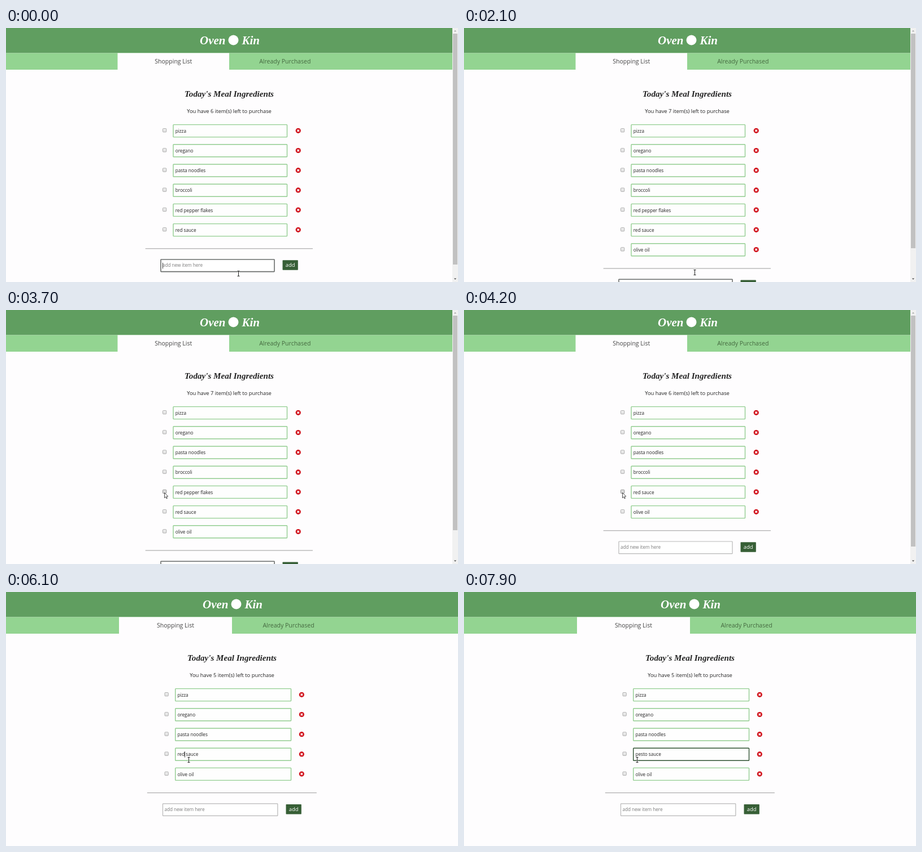
An HTML page with a canvas that plays this animation: 800 px wide and 451 px high, repeating every 8000 ms.

```html
<!DOCTYPE html>
<html lang="en">
<head>
<meta charset="utf-8">
<title>Shopping list</title>
<style>
  html, body { margin: 0; width: 100%; height: 100%; overflow: hidden; background: #fefdfe; }
  canvas { display: block; width: 800px; height: 451px; }
</style>
</head>
<body>
<canvas id="stage" width="800" height="451"></canvas>
<script>
const ctx = document.getElementById('stage').getContext('2d');
const LOOP = 8000, STEP = 100;
const ADD = 1600, CHECK_1 = 4000, CHECK_2 = 5400, FOCUS = 6100;
const TYPE_1 = 200, TYPE_2 = 6800;
const ROW_TOP = 182.6, PITCH = 35.2;
const sans = px => px + 'px "Open Sans", "Noto Sans", sans-serif';
const fancy = px => 'italic bold ' + px + 'px "Liberation Serif", "Noto Serif", serif';
const ITEM = sans(8.19), BODY = sans(9.36), TAB = sans(10.53);

// horizontal layout with and without the scrollbar
const NARROW = { w: 790, check: 277, box: 296, boxW: 201.5, icon: 517.2, input: 274, inputW: 201, button: 489.5 };
const WIDE = { w: 800, check: 280.5, box: 299.7, boxW: 204.8, icon: 523.3, input: 277.5, inputW: 203.3, button: 495.5 };

// pointer path: time, x, y
const PATH = [
  [0, 411, 436], [2000, 411, 436], [2900, 316, 371], [3100, 316, 371], [3700, 280.5, 324.5],
  [4500, 280.5, 324.5], [5000, 282, 290], [5500, 282, 290], [6000, 323, 298],
  [6200, 323, 298], [6600, 306, 298], [8000, 306, 298]
];

function pointer(t) {
  const i = Math.max(1, PATH.findIndex(p => p[0] > t));
  const [t0, x0, y0] = PATH[i - 1], [t1, x1, y1] = PATH[i];
  const u = (t - t0) / (t1 - t0), e = u * u * (3 - 2 * u);
  return { x: x0 + (x1 - x0) * e, y: y0 + (y1 - y0) * e };
}

const typed = (word, t, start, gap) =>
  word.slice(0, Math.max(0, Math.min(word.length, Math.floor((t - start) / gap) + 1)));

// the caret stays solid for half a second after each key, then blinks
const blink = ms => Math.floor(ms / 500) % 2 === 0;

function rect(x, y, w, h, color) {
  ctx.fillStyle = color;
  ctx.fillRect(x, y, w, h);
}

function rounded(x, y, w, h, r, fill, stroke, line) {
  ctx.beginPath();
  ctx.roundRect(x, y, w, h, r);
  if (fill) { ctx.fillStyle = fill; ctx.fill(); }
  if (stroke) { ctx.strokeStyle = stroke; ctx.lineWidth = line; ctx.stroke(); }
}

function disc(x, y, r, color) {
  ctx.fillStyle = color;
  ctx.beginPath();
  ctx.arc(x, y, r, 0, Math.PI * 2);
  ctx.fill();
}

function text(str, x, y, font, color, align = 'left') {
  ctx.font = font;
  ctx.fillStyle = color;
  ctx.textAlign = align;
  ctx.fillText(str, x, y);
}

function width(str, font) {
  ctx.font = font;
  return ctx.measureText(str).width;
}

function poly(points, fill, stroke) {
  ctx.beginPath();
  points.forEach(([x, y]) => ctx.lineTo(x, y));
  ctx.closePath();
  ctx.fillStyle = fill;
  ctx.fill();
  if (stroke) { ctx.strokeStyle = stroke; ctx.lineWidth = 0.8; ctx.stroke(); }
}

function header(L) {
  const c = L.w / 2, q = L.w / 4;
  rect(0, 0, L.w, 44.5, '#609e60');
  rect(0, 44.5, L.w, 29.5, '#93d491');
  rect(q, 44.5, q, 30, '#fefdfe');
  text('Oven', c - 52, 28.5, fancy(21), '#fff');
  disc(c + 7.5, 21.5, 9, '#fff');
  text('Kin', c + 22.5, 28.5, fancy(21), '#fff');
  text('Shopping List', q * 1.5, 63.2, TAB, '#444', 'center');
  text('Already Purchased', q * 2.5, 63.2, TAB, '#44683f', 'center');
  text("Today's Meal Ingredients", c, 122, fancy(15.1), '#222', 'center');
}

function checkbox(x, y, hover) {
  const g = ctx.createLinearGradient(0, y - 4, 0, y + 3);
  g.addColorStop(0, hover ? '#e4e4e4' : '#f0f0f0');
  g.addColorStop(1, hover ? '#cfcfcf' : '#dedede');
  rounded(x + 0.5, y - 4.1, 6.3, 6.3, 1, g, hover ? '#8a8a8a' : '#a8a8a8', 0.9);
}

function removeIcon(x, y) {
  disc(x, y, 4.6, '#d0111b');
  ctx.strokeStyle = '#fff';
  ctx.lineWidth = 1.5;
  ctx.beginPath();
  for (const s of [-1, 1]) {
    ctx.moveTo(x - 1.7, y - 1.7 * s);
    ctx.lineTo(x + 1.7, y + 1.7 * s);
  }
  ctx.stroke();
}

function row(L, label, y, hover, focused) {
  checkbox(L.check, y, hover);
  rounded(L.box, y - 11, L.boxW, 22, 0.8, '#fefefe', focused ? '#2f5231' : '#92cd90', 1.4);
  text(label, L.box + 3.7, y + 3.1, ITEM, '#222');
  removeIcon(L.icon, y - 0.3);
}

function caret(x, y) {
  rect(Math.round(x), y - 5, 0.8, 10.5, '#111');
}

function footer(L, y, value, focused, caretOn) {
  rect(L.w * 0.3125 - 0.2, y - 0.6, L.w * 0.375, 1.1, '#a5a5a5');
  const mid = y + 30;
  rounded(L.input, mid - 10.8, L.inputW, 21.6, 0.6, '#fff', focused ? '#6a6d6c' : '#b7b7b7', focused ? 1.6 : 1.2);
  const x = L.input + 2.9;
  text(value || 'add new item here', x, mid + 2.6, ITEM, value ? '#222' : '#7b7b7b');
  if (focused && caretOn) caret(x + width(value, ITEM) - 0.3, mid);
  rounded(L.button, mid - 9.6, 27.3, 17.6, 0.8, '#375f36');
  text('add', L.button + 13.65, mid + 2.6, BODY, '#fff', 'center');
}

function scrollbar(thumbEnd) {
  rect(790, 0, 10, 451, '#f1f1f1');
  rect(791, 10, 8, thumbEnd - 10, '#c1c1c1');
  poly([[792.8, 6.3], [795, 4], [797.2, 6.3]], '#a3a3a3');
  poly([[792.8, 444.5], [795, 446.8], [797.2, 444.5]], '#505050');
}

// item being edited: drag selection, then new text
function edit(L, t, y) {
  const x = L.box + 3.7;
  if (t >= TYPE_2) {
    const word = typed('pesto', t, TYPE_2, 125);
    const last = TYPE_2 + (word.length - 1) * 125;
    if (blink(t - last)) caret(x + width(word, ITEM), y);
    return;
  }
  const from = Math.max(0, 3 - Math.max(0, Math.floor((t - 6200) / 130)));
  const end = x + width('red', ITEM);
  if (from === 3) { caret(end - 0.3, y); return; }
  const start = x + width('red'.slice(0, from), ITEM);
  rect(start, y - 5.3, end - start, 11, '#3390ff');
  text('red'.slice(from), start, y + 3.1, ITEM, '#fff');
}

function drawPointer(p, beam) {
  if (beam) {
    const x = Math.round(p.x), y = Math.round(p.y);
    for (const [w, c] of [[2.2, 'rgba(255,255,255,.7)'], [1, '#222']]) {
      ctx.strokeStyle = c;
      ctx.lineWidth = w;
      ctx.beginPath();
      ctx.moveTo(x + 0.5, y - 4);
      ctx.lineTo(x + 0.5, y + 4);
      for (const s of [-4.5, 4.5]) {
        ctx.moveTo(x - 1.5, y + s);
        ctx.lineTo(x + 2.5, y + s);
      }
      ctx.stroke();
    }
    return;
  }
  const shape = [[0, 0], [0, 9.2], [2.1, 7.2], [3.5, 10.4], [4.9, 9.8], [3.5, 6.7], [6.3, 6.5]];
  poly(shape.map(([x, y]) => [p.x + x, p.y + y]), '#fff', '#222');
}

function draw(t) {
  const L = t < CHECK_2 ? NARROW : WIDE;
  const items = ['pizza', 'oregano', 'pasta noodles'];
  if (t < CHECK_2) items.push('broccoli');
  if (t < CHECK_1) items.push('red pepper flakes');
  items.push((t < TYPE_2 ? 'red' : typed('pesto', t, TYPE_2, 125)) + ' sauce');
  if (t >= ADD) items.push('olive oil');

  const p = pointer(t), beam = p.x > L.box;
  rect(0, 0, 800, 451, '#fefdfe');
  header(L);
  text(`You have ${items.length} item(s) left to purchase`, L.w / 2, 151.3, BODY, '#222', 'center');

  items.forEach((label, i) => {
    const y = ROW_TOP + i * PITCH;
    const hover = !beam && Math.abs(p.y - y) < 5 && p.x < L.check + 8;
    const editing = i === 3 && t >= FOCUS;
    row(L, label, y, hover, editing && t > FOCUS);
    if (editing) edit(L, t, y);
  });

  const value = t < ADD ? typed('olive oil', t, TYPE_1, 130) : '';
  const lastKey = value ? TYPE_1 + (value.length - 1) * 130 : t < ADD ? 0 : ADD;
  footer(L, ROW_TOP + items.length * PITCH - 2, value, t < CHECK_1, blink(t - lastKey));
  if (L === NARROW) scrollbar(items.length > 6 ? 391 : 420);
  drawPointer(p, beam);
}

function tick(now) {
  draw(Math.floor((now % LOOP) / STEP) * STEP);
  requestAnimationFrame(tick);
}
draw(0);
requestAnimationFrame(tick);
</script>
</body>
</html>
```
